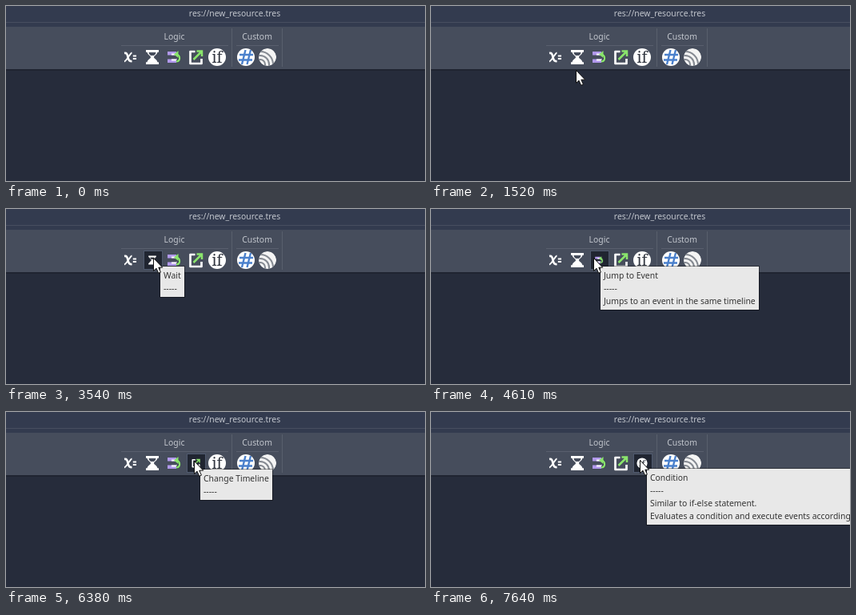
An HTML page for the animation above (8000 ms loop, 524 by 219 pixels).

```html
<!DOCTYPE html>
<html lang="en">
<head>
<meta charset="utf-8">
<title>Event toolbar</title>
<style>
  html, body { margin: 0; width: 100%; height: 100%; overflow: hidden; background: #262c3b; }
  svg { display: block; }
  text { font: 10.4px "Noto Sans", sans-serif; white-space: pre; }
  .label { fill: #c3c7ce; text-anchor: middle; }
  #tip text { fill: #333; }
  #if text { font: 500 19px "Noto Serif", serif; fill: #333842; text-anchor: middle; }
</style>
</head>
<body>
<svg width="524" height="219" viewBox="0 0 524 219">
  <defs>
    <g id="variable" fill="none" stroke="#fff">
      <path stroke-width="2.6" d="M-8-5c3-.5 3.5 1 4.5 5s1.5 5.500 5 5"/>
      <path stroke-width="1.8" d="M1.500-5.500C-1-5-5 5-8 5.500"/>
      <path stroke-width="2" d="M2.800-1.500h4.200M2.800 2h4.200"/>
    </g>
    <g id="wait" fill="#fff">
      <path d="M-8-9H8v2.800H-8zM-8 6.200H8V9H-8z"/>
      <path fill-rule="evenodd" d="M-6.500-7C-6.500-3-2-2-2 0S-6.500 3-6.500 7h13C6.500 3 2 2 2 0S6.500-3 6.500-7zM-4.500-6h9C4.500-4 3-3 2-2H-2C-3-3-4.500-4-4.500-6z"/>
    </g>
    <g id="jump">
      <path d="M-8-7H3v4.500H-8zM-8 2.500H4V7H-8z" fill="#b198ec"/>
      <path d="M-3-4.500H3v2H-3zM-3 2.500H4v2H-3z" fill="#fff"/>
      <path d="M3 5.500C9 5 8-3 3-3.500" fill="none" stroke="#3b4352" stroke-width="4"/>
      <path d="M3 5.500C9 5 8-3 3-3.500" fill="none" stroke="#8ae56c" stroke-width="2.200"/>
      <path d="M5.500-8V1L0-3.500z" fill="#8ae56c"/>
    </g>
    <g id="change" fill="none">
      <path d="M-1-7H-7V8H7V2" stroke="#fff" stroke-width="2.700" stroke-linejoin="round"/>
      <path d="M-3 3L7-7M1-7.500H7.500V-1" stroke="#8ae56c" stroke-width="2.500"/>
    </g>
    <g id="if">
      <circle r="11" fill="#fff"/>
      <text y="6.500">if</text>
    </g>
    <g id="hash">
      <circle r="11" fill="#fff"/>
      <path d="M-.5-9L-5 9M6-9L1.500 9M-8-3H9M-9 3.500H8" fill="none" stroke="#4a80cc" stroke-width="2.400"/>
    </g>
    <clipPath id="disc"><circle r="11"/></clipPath>
    <g id="signal" clip-path="url(#disc)">
      <circle r="11" fill="#f4f4f4"/>
      <g fill="none" stroke="#858a92" stroke-width="2">
        <circle cx="-9" cy="9" r="6"/>
        <circle cx="-9" cy="9" r="11"/>
        <circle cx="-9" cy="9" r="16"/>
      </g>
    </g>
  </defs>

  <rect width="524" height="26" fill="#333b4f"/>
  <rect y="20" width="524" height="1" fill="#474e60"/>
  <rect y="26" width="524" height="53" fill="#464d5c"/>
  <rect y="79" width="524" height="2" fill="#202531"/>
  <path d="M144 49.500H278M288 49.500H341M282.500 28V76M345.500 28V76" stroke="#fff" stroke-opacity=".1"/>
  <text class="label" x="286" y="13">res://new_resource.tres</text>
  <text class="label" x="210.500" y="42">Logic</text>
  <text class="label" x="314" y="42">Custom</text>

  <rect id="hover" y="52.500" width="23" height="23" fill="#202531" stroke="#4f596e"/>
  <g id="icons"></g>
  <g id="tip"></g>
  <path id="cursor" d="M.5.500V16.500L4 13.200L6.700 19.300L9.400 18.100L6.800 12.200H11.700Z" fill="#fff" stroke="#111"/>
</svg>
<script>
const $ = id => document.getElementById(id);
const LOOP = 8000;
const RULE = "-----";

const icons = [
  ["variable", 156], ["wait", 183], ["jump", 210], ["change", 237.5],
  ["if", 264], ["hash", 300], ["signal", 327]
];

// Each move runs in discrete steps from the end of the one before it;
// a hovered icon opens its tooltip at tipAt.
const moves = [
  { at: 430, steps: 9, dt: 92.5, x: 240, y: 115, ease: 1 },
  { at: 1240, steps: 5, x: 181, y: 80, ease: 1 },
  { at: 1590, steps: 4, x: 159, y: 61, icon: 0, tipAt: 2280, tip: [167, 72, 66, "Set Variable", RULE] },
  { at: 2940, steps: 3, x: 184, y: 61, icon: 1, tipAt: 3540, tip: [193, 72, 30, "Wait", RULE] },
  { at: 3940, steps: 3, x: 203, y: 61, icon: 2, tipAt: 4610,
    tip: [212, 72, 198, "Jump to Event", RULE, "Jumps to an event in the same timeline"] },
  { at: 5620, steps: 4, x: 235, y: 61, icon: 3, tipAt: 6380, tip: [243, 72, 90, "Change Timeline", RULE] },
  { at: 7040, steps: 2, x: 261, y: 60, icon: 4, tipAt: 7640,
    tip: [270, 71, 300, "Condition", RULE, "Similar to if-else statement.",
      "Evaluates a condition and execute events accordingly."] }
];
const entry = { x: 348, y: 152, icon: -1 };

$("icons").innerHTML = icons.map(([id]) => `<use href="#${id}"/>`).join("");
const uses = [...$("icons").children];

function tipMarkup([x, y, w, ...lines]) {
  const h = lines.length * 16 + 6;
  return `<rect x="${x - 1}" y="${y - 1}" width="${w + 2}" height="${h + 2}" fill="#000" opacity=".4"/>
    <rect x="${x}" y="${y}" width="${w}" height="${h}" fill="#e8e8e8"/>` +
    lines.map((s, i) => `<text x="${x + 4}" y="${y + 15 + i * 16}">${s}</text>`).join("");
}

let shownTip;
function showTip(tip) {
  if (tip === shownTip) return;
  shownTip = tip;
  $("tip").innerHTML = tip ? tipMarkup(tip) : "";
}

function draw(t) {
  const n = moves.findLastIndex(m => t >= m.at);
  const move = moves[n];
  const from = moves[n - 1] || entry;
  let hovered = -1;

  $("cursor").style.display = move ? "" : "none";
  if (move) {
    const { at, steps, dt = 70, ease = 1.33, icon = -1 } = move;
    const step = Math.min(steps, Math.floor((t - at) / dt) + 1);
    const k = 1 - (1 - step / steps) ** ease;
    const mix = axis => Math.round(from[axis] + (move[axis] - from[axis]) * k);
    $("cursor").setAttribute("transform", `translate(${mix("x")} ${mix("y")})`);
    hovered = step === steps ? icon : step === 1 ? from.icon ?? -1 : -1;
  }

  $("hover").style.display = hovered < 0 ? "none" : "";
  $("hover").setAttribute("x", 145.5 + 27 * hovered);
  uses.forEach((use, i) =>
    use.setAttribute("transform", `translate(${icons[i][1]} 64) scale(${i === hovered ? 0.6 : 1})`));
  showTip(move && t >= move.tipAt ? move.tip : null);
}

const start = performance.now();
function frame() {
  draw((performance.now() - start) % LOOP);
  requestAnimationFrame(frame);
}
frame();
</script>
</body>
</html>
```
